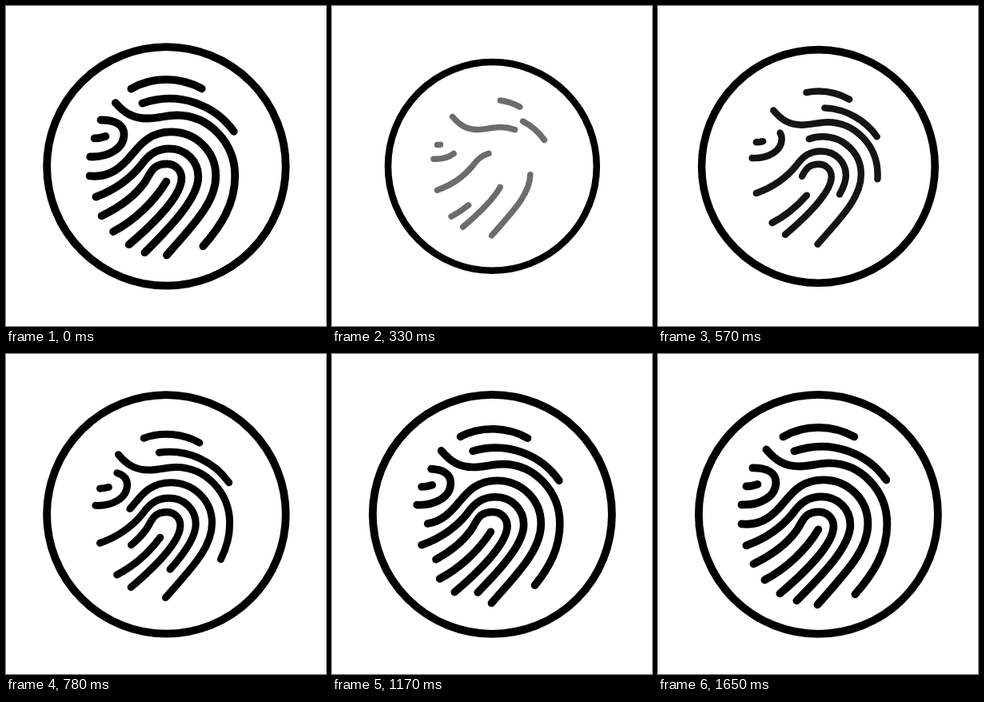
These frames come from a looping animation (400x400 px, 3800 ms). An HTML page:

```html
<!DOCTYPE html>
<html lang="en">
<head>
<meta charset="utf-8">
<title>Fingerprint</title>
<style>
  html, body { margin: 0; width: 100%; height: 100%; overflow: hidden; background: #fff; }
  svg { display: block; width: 100vw; height: 100vh; }
</style>
</head>
<body>
<svg viewBox="-200.4 -200.4 400 400" fill="none" stroke="#000" stroke-width="9.8" stroke-linecap="round">
  <circle id="ring" r="149.5"/>
  <g id="print"></g>
</svg>
<script>
const LOOP = 3800;
const TURN = 300; // the ridges leave before this moment and return after it

// Each ridge begins at the end from which it is redrawn.
const ridges = [
  'M245 103C218 88 183 87 156 103',
  'M285 157C262 124 217 105 170 121',
  'M135 119C146 132 157 140 176 140C190 140 200 136 213 136C254 136 286 171 286 212C286 248 268 275 246 300',
  'M104 188C127 189 147 178 147 160C147 148 136 142 118 142',
  'M110 165Q117 165 124 162.5',
  'M199 313C232 275 262 246 262 212C262 180 236 157 206 157C180 157 168 172 158 184C145 200 130 215 104 212',
  'M110 239C138 229 155 215 168 199C178 185 188 178 204 178C225 178 240 194 240 213C240 240 205 276 173 308',
  'M152 299C184 272 219 237 219 215C219 204 210 197 201 197C182 197 181 208 173 220C160 238 142 251 119 262',
  'M133 282C160 268 185 244 200 219'
];

const ring = document.getElementById('ring');
const print = document.getElementById('print');

const paths = ridges.map(d => {
  const path = document.createElementNS('http://www.w3.org/2000/svg', 'path');
  path.setAttribute('d', d);
  path.setAttribute('pathLength', 1);
  print.appendChild(path);
  return path;
});

const clamp = u => Math.min(1, Math.max(0, u));
const mix = (a, b, u) => a + (b - a) * u;
const easeOut = u => 1 - (1 - clamp(u)) ** 3;
const decay = u => (1 - Math.exp(-4.32 * clamp(u))) / (1 - Math.exp(-4.32));

function pose(t) {
  if (t < TURN) {
    const leave = easeOut(t / 450);
    return {
      ring: mix(1, 0.85, easeOut(t / TURN)),
      scale: mix(1, 0.75, leave),
      from: leave, to: 1, opacity: 1
    };
  }
  const grow = easeOut((t - TURN) / 600);
  return {
    ring: mix(0.85, 1, grow),
    scale: mix(0.75, 1, easeOut((t - TURN) / 1500)),
    from: 0, to: decay((t - 180) / 1470),
    opacity: mix(0.5, 1, grow)
  };
}

function draw(t) {
  const p = pose(t);
  ring.setAttribute('transform', `scale(${p.ring})`);
  print.setAttribute('transform', `scale(${p.scale}) translate(-200 -200)`);
  print.setAttribute('opacity', p.opacity);
  for (const path of paths) {
    path.setAttribute('stroke-dasharray', `${p.to - p.from} 2`);
    path.setAttribute('stroke-dashoffset', -p.from);
  }
}

const start = performance.now();
function tick() {
  draw((performance.now() - start) % LOOP);
  requestAnimationFrame(tick);
}
draw(0);
requestAnimationFrame(tick);
</script>
</body>
</html>
```
